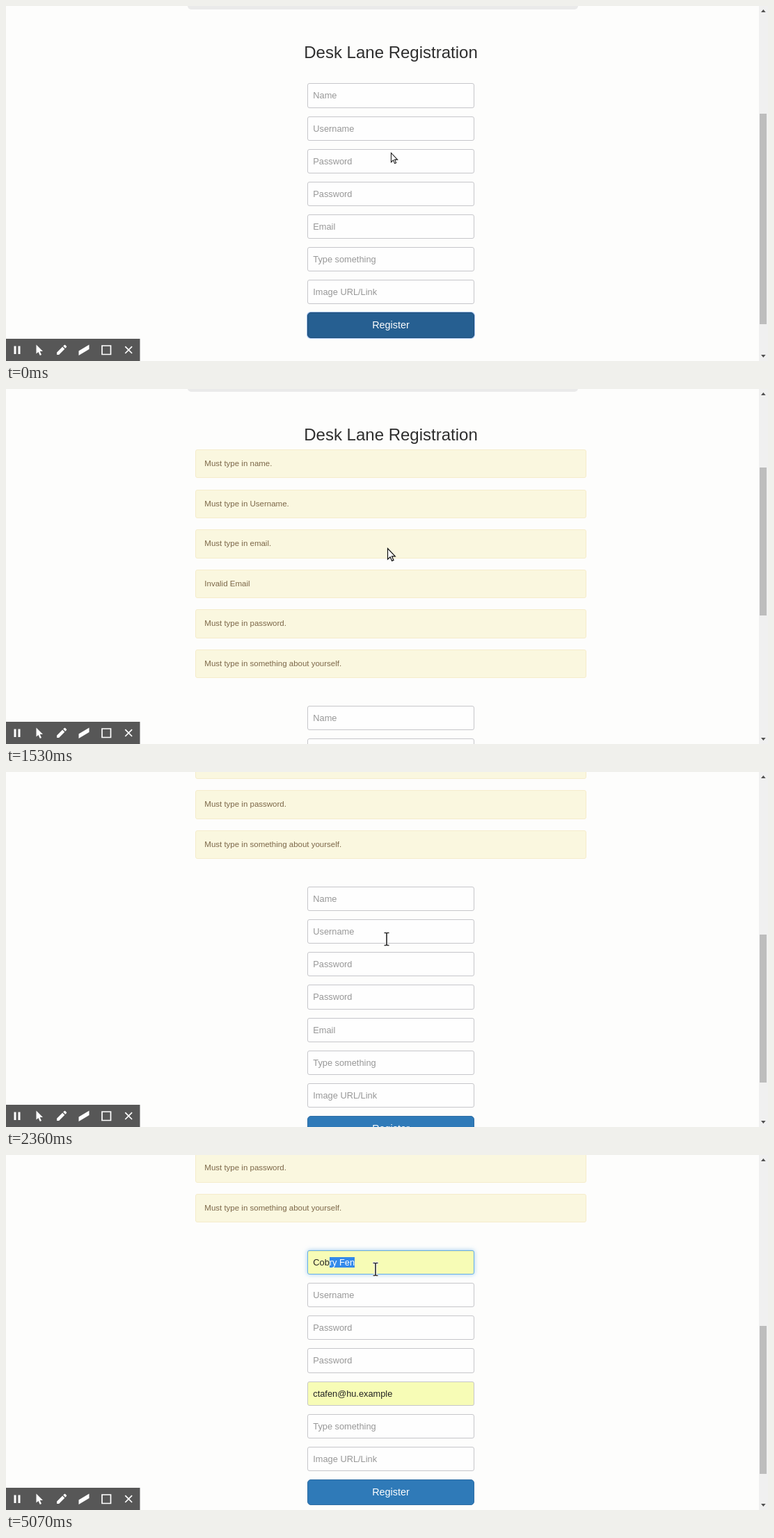
Animation of 1095x511 px, one loop 5420 ms. Source, as an HTML page:

```html
<!DOCTYPE html>
<html lang="en">
<head>
<meta charset="utf-8">
<title>Registration form</title>
<style>
html, body { margin: 0; width: 100%; height: 100%; overflow: hidden; background: #fdfdfc; }
body { position: relative; font-family: "Liberation Sans", Arial, sans-serif; color: #2e2e2e; }
#page, #form, #alerts { position: absolute; left: 0; top: 0; width: 1082px; }
.box { position: absolute; box-sizing: border-box; white-space: pre; }
.brand { font-size: 19.2px; color: #757575; }
.link { font-size: 11.3px; color: #3a6a92; }
.rule { background: #e3e3dd; }
.hero { background: #eaeaea; border-radius: 5px; font-size: 50.4px; text-align: center; }
.heading { font-size: 24px; text-align: center; }
.alert { background: #faf7df; border: 1px solid #f5eccb; border-radius: 3px; padding-left: 12px; font-size: 11.5px; color: #7c6748; }
.field { background: #fefefe; border: 1px solid #c6c6ca; border-radius: 3px; padding-left: 7.6px; font-size: 12.8px; color: #979797; }
.field.focus { border-color: #66afe9; box-shadow: inset 0 1px 1px rgba(0,0,0,.07), 0 0 6px rgba(102,175,233,.6); }
.field.filled { background: #f7fcb6; }
.field b { font-weight: normal; color: #222; }
.field mark { background: #3289ea; color: #fff; }
.field i { border-left: 1px solid #222; margin-right: -1px; }
.button { background: #2f7ab8; border: 1px solid #2e6da4; border-radius: 5px; font-size: 14.4px; color: #fff; text-align: center; }
.button.pressed { background: #265f91; border-color: #204d74; box-shadow: 0 0 0 1px #a3c4f3; }
svg { position: absolute; left: 0; top: 0; }
</style>
</head>
<body>
<div id="page"><div id="alerts"></div><div id="form"></div></div>
<svg width="1095" height="511" viewBox="0 0 1095 511">
  <rect x="1082" width="13" height="511" fill="#f0f0f0"/>
  <rect id="thumb" x="1083" width="10" fill="#bdbdbd"/>
  <path d="M1085 9l3.3-4 3.3 4zM1085 502l3.3 4 3.3-4z" fill="#505050"/>
  <rect y="479" width="192.5" height="32" fill="#575757"/>
  <g fill="#fff">
    <path d="M11.5 489.5h3v11.5h-3zM17.5 489.5h3v11.5h-3z"/>
    <path d="M43.5 487.5V500.5l3-2.6 2.3 5 2.2-1-2.3-4.8h4.3z"/>
    <path d="M73 502v-3.2l8.2-8.2 3.1 3.1-8.2 8.3zM82.2 489.6l1.6-1.6q.7-.6 1.4 0l1.7 1.8q.6.7 0 1.3l-1.6 1.6z"/>
    <path d="M104.5 496.5L119.5 487.5V494L104.5 503z"/>
  </g>
  <path d="M138 489h12.5v12.5H138zM171.3 490.2l9.8 9.8M181.1 490.2l-9.8 9.8" fill="none" stroke="#fff" stroke-width="1.7"/>
  <circle id="ring" cx="532" cy="166" fill="none" stroke="#f08080" stroke-width="3"/>
  <path id="arrow" d="M.5.5V16.2L4.1 12.8 6.6 18.4 9 17.4 6.5 11.9H11.3Z" fill="#fff" stroke="#111" stroke-width="1.2"/>
  <g id="beam" fill="none">
    <path d="M-4-9H4M-4 9H4M0-9V9" stroke="#fff" stroke-width="3.4"/>
    <path d="M-3.5-9H-1L0-8 1-9H3.5M-3.5 9H-1L0 8 1 9H3.5M0-9V9" stroke="#333" stroke-width="1.7"/>
  </g>
</svg>
<script>
const LOOP = 5420, RELOAD = 150, FOCUS = 2800, FILL = 5070;
const FORM_TOP = 351.4, ALERT_PITCH = 57.6, FIELD_PITCH = 47.15, FIELD_HEIGHT = 35.2;
const $ = id => document.getElementById(id);

function box(parent, kind, x, y, w, h, text = '') {
  const el = document.createElement('div');
  el.className = 'box ' + kind;
  const border = /alert|field|button/.test(kind) ? 2 : 0;
  el.style.cssText = `left:${x}px;top:${y}px;width:${w}px;height:${h}px;line-height:${h - border}px`;
  el.textContent = text;
  return parent.appendChild(el);
}

const page = $('page');
box(page, 'brand', 260.4, 17, 200, 32, 'Forest Desk');
box(page, 'link', 657, 25, 50, 16, 'Home');
box(page, 'link', 713.4, 25, 60, 16, 'Register');
box(page, 'link', 781.4, 25, 50, 16, 'Login');
box(page, 'rule', 260.5, 64, 561, 1);
box(page, 'hero', 260.5, 89, 561, 156);
box(page, 'hero', 260.5, 144, 561, 55.4, 'Forest Desk');
box(page, 'heading', 272.5, 294, 561, 26.4, 'Desk Lane Registration');

['Must type in name.', 'Must type in Username.', 'Must type in email.', 'Invalid Email',
  'Must type in password.', 'Must type in something about yourself.'
].forEach((text, i) => box($('alerts'), 'alert', 272.3, 327.9 + i * ALERT_PITCH, 561.4, 41.6, text));

const fields = ['Name', 'Username', 'Password', 'Password', 'Email', 'Type something', 'Image URL/Link']
  .map((text, i) => box($('form'), 'field', 432.7, i * FIELD_PITCH, 240.6, FIELD_HEIGHT, text));
const button = box($('form'), 'button', 432.7, 7 * FIELD_PITCH, 240.6, 36.8, 'Register');

// Keyframes are [time, ...values], joined linearly.
const scrollKeys = [[RELOAD, 0], [1000, 0], [1040, 16], [1180, 170], [1280, 240], [1530, 240],
  [1700, 352], [1800, 352], [1900, 400], [2070, 400], [2210, 484], [2450, 560]];
const pointerKeys = [[60, 553, 211], [450, 560, 184], [640, 560, 184], [790, 560, 192], [930, 560, 192],
  [1040, 550, 225], [1180, 548, 229], [1530, 548, 229], [1700, 548, 237], [2070, 548, 237],
  [2210, 547, 240], [2400, 547, 240], [2590, 531, 164]];

function sample(keys, t) {
  const next = keys.findIndex(k => k[0] > t);
  if (next < 1) return (next ? keys[keys.length - 1] : keys[0]).slice(1);
  const a = keys[next - 1], b = keys[next];
  const f = (t - a[0]) / (b[0] - a[0]);
  return a.slice(1).map((v, i) => v + (b[i + 1] - v) * f);
}

function nameField(t) {
  if (t >= FILL) return '<b>Cob<mark>ry Fen</mark></b>';
  const typed = 'Cob'.slice(0, [3850, 4050, 4200].filter(at => t >= at).length);
  const caret = t >= FOCUS && t < 3370 || t >= 3850 && t < 4720 ? '<i></i>' : '';
  return typed ? `<b>${typed}</b>${caret}` : caret + 'Name';
}

function draw(t) {
  const reloaded = t >= RELOAD, filled = t >= FILL;
  const scroll = reloaded ? Math.round(sample(scrollKeys, t)[0]) : 240;
  const formTop = FORM_TOP + (reloaded ? 6 * ALERT_PITCH : 0);
  const pageHeight = 814.6 + (reloaded ? 6 * ALERT_PITCH : 0);

  page.style.top = -scroll + 'px';
  $('alerts').style.display = reloaded ? '' : 'none';
  $('form').style.top = formTop + 'px';
  $('thumb').setAttribute('y', Math.round(13 + scroll / pageHeight * 483));
  $('thumb').setAttribute('height', Math.round(511 / pageHeight * 483));

  button.classList.toggle('pressed', !reloaded);
  fields[0].classList.toggle('focus', t >= FOCUS);
  fields[0].classList.toggle('filled', filled);
  fields[4].classList.toggle('filled', filled);
  fields[0].innerHTML = nameField(t);
  fields[4].innerHTML = filled ? '<b>ctafen@hu.example</b>' : 'Email';

  const [x, y] = sample(pointerKeys, t).map(Math.round);
  const depth = y + scroll - formTop;
  const overField = reloaded && depth >= 0 && depth % FIELD_PITCH < FIELD_HEIGHT;
  $('arrow').setAttribute('transform', `translate(${x} ${y}) scale(${reloaded ? 1 : .85})`);
  $('arrow').style.display = overField ? 'none' : '';
  $('beam').setAttribute('transform', `translate(${x} ${y + .5})`);
  $('beam').style.display = overField ? '' : 'none';

  const grow = Math.min(1, Math.max(0, (t - 2600) / 300));
  $('ring').setAttribute('r', 26 * (1 - (1 - grow) ** 2));
  $('ring').style.display = t >= 2620 && t < 3070 ? '' : 'none';
  $('ring').style.opacity = Math.min(1, (3070 - t) / 110);
}

const start = performance.now();
function frame() {
  draw((performance.now() - start) % LOOP);
  requestAnimationFrame(frame);
}
frame();
</script>
</body>
</html>
```
